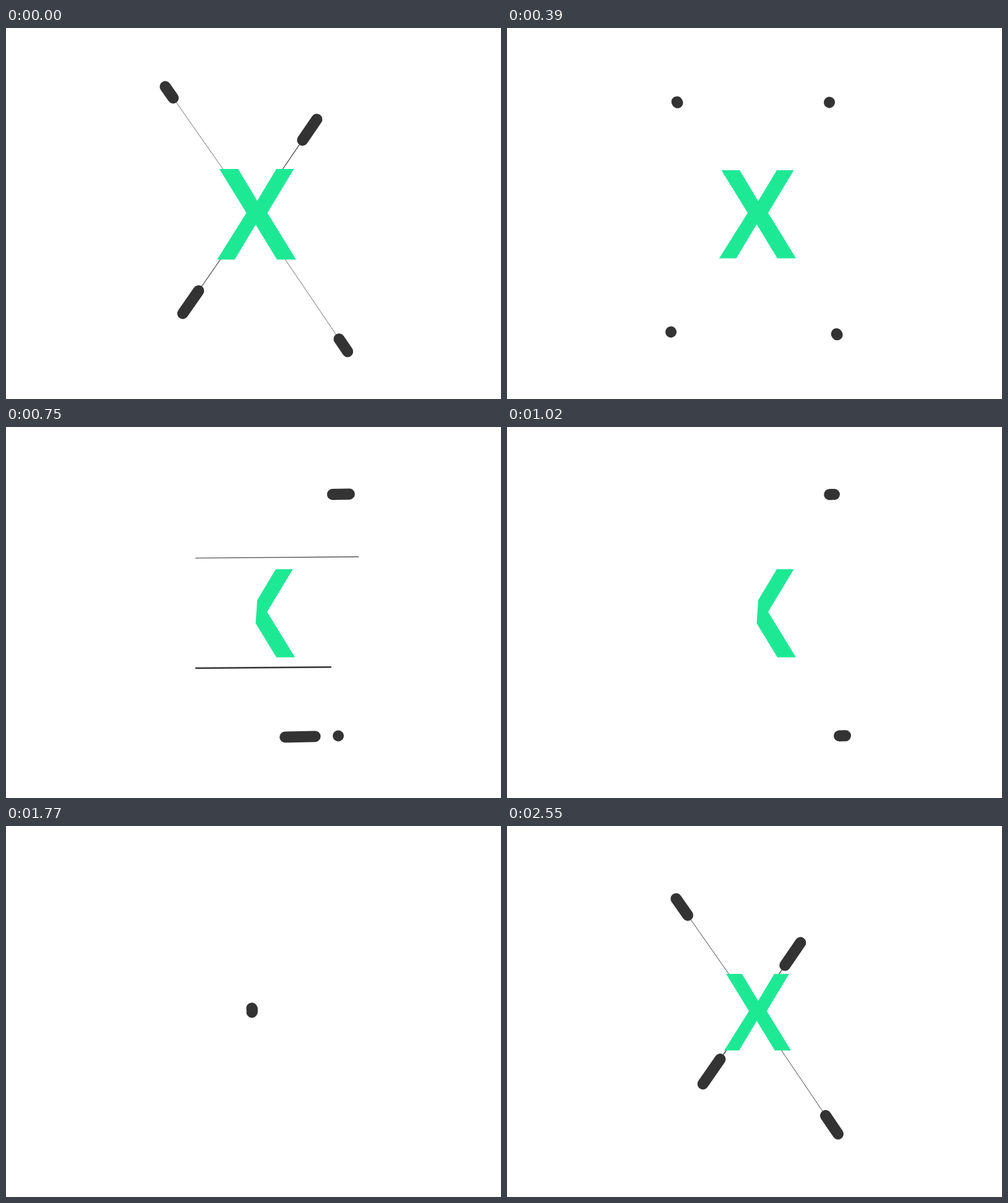
Recreate the animation shown at these times as an HTML page with a canvas. Size 800 by 600 pixels, loop 2.58 s.

```html
<!DOCTYPE html>
<html>
<head>
<meta charset="utf-8">
<style>
  html, body { margin: 0; width: 100%; height: 100%; overflow: hidden; background: #fff; }
  canvas { display: block; }
</style>
</head>
<body>
<canvas id="stage" width="800" height="600"></canvas>
<script>
const ctx = document.getElementById('stage').getContext('2d');
const LOOP = 2580, STEP = 30, SMEAR = 25;
const DARK = '#333', GREEN = '#1de995';
const CENTER = [399.5, 298];

const LEFT_HALF = [[346.5, 230], [376, 230], [406, 280], [403.5, 317.5], [370.5, 372.5], [343, 372.5], [389, 299]];
const RIGHT_HALF = [[436, 230], [463.5, 230], [422, 299], [467, 372.5], [437, 372.5], [403.5, 317.5], [406, 280]];

// Corner dots shoot out along two diagonals, one slightly later
const CORNERS = [
  { to: [271.5, 115], start: -191 },
  { to: [537, 501], start: -191 },
  { to: [526, 113], start: -132 },
  { to: [259.5, 499.5], start: -132 }
];
const SWEEPS = [
  { from: [271, 115], to: [529, 109], start: 562, line: [306, 212, 240] },
  { from: [259, 506], to: [537, 499.5], start: 610, line: [306, 390, 254] }
];

// Underdamped spring from 0 to 1, starting at rest
function spring(t, omega = 0.01247, damping = 0.512) {
  if (t <= 0) return 0;
  const a = omega * t;
  return 1 - Math.exp(-damping * a) * (Math.cos(a) + damping * Math.sin(a));
}

// Quick run to the centre, then a decaying wobble
function collapse(t) {
  const u = Math.max(0, (t - 1052) / 180);
  if (u < 1) return 1.29 * u - 0.29 * u * u;
  const s = t - 1232;
  return 1 + 0.3 * Math.exp(-0.0047 * s) * Math.sin(s * 2 * Math.PI / 480);
}

const mix = (a, b, k) => [a[0] + (b[0] - a[0]) * k, a[1] + (b[1] - a[1]) * k];

function line(a, b, width, cap) {
  if (width <= 0) return;
  ctx.strokeStyle = DARK;
  ctx.lineWidth = width;
  ctx.lineCap = cap;
  ctx.beginPath();
  ctx.moveTo(...a);
  ctx.lineTo(b[0] + 0.01, b[1]);
  ctx.stroke();
}

// A dot smeared from a moment ago to its current position
function dot(from, to, ease, t) {
  line(mix(from, to, ease(t - SMEAR)), mix(from, to, ease(t)), 18, 'round');
}

function shape(points) {
  ctx.fillStyle = GREEN;
  ctx.beginPath();
  points.forEach(p => ctx.lineTo(...p));
  ctx.fill();
}

function drawBurst(t) {
  for (const { to, start } of CORNERS) {
    const age = t - start;
    if (age > 0) line(CENTER, mix(CENTER, to, spring(age)), 1.1 - (age - 134) * 0.007, 'butt');
    dot(CENTER, to, spring, age);
  }
  const scale = spring(t + 120, 0.02, 0.8);
  ctx.save();
  ctx.translate(405, 300.5);
  ctx.scale(scale, scale);
  ctx.translate(-405, -300.5);
  shape([...LEFT_HALF.slice(0, 3), ...RIGHT_HALF.slice(0, 6), ...LEFT_HALF.slice(4)]);
  ctx.restore();
}

function drawSweep(t) {
  shape(RIGHT_HALF);
  for (const { from, to, start, line: [x, y, length] } of SWEEPS) {
    const age = t - start;
    const reach = length * spring(age);
    if (age > 0) line([x, y], [x + reach, y - reach * 0.008], 2.5 - (age - 141) * 0.031, 'butt');
    dot(to, to, spring, 0);
    dot(from, to, spring, age);
  }
}

function drawCollapse(t) {
  SWEEPS.forEach(({ to }) => dot(to, CENTER, collapse, t));
}

function draw(t) {
  ctx.clearRect(0, 0, 800, 600);
  if (t >= 2280) drawBurst(t - LOOP);
  else if (t < 555) drawBurst(t);
  else if (t < 1050) drawSweep(t);
  else drawCollapse(t);
}

function tick() {
  const t = performance.now() % LOOP;
  draw(Math.floor(t / STEP) * STEP);
  requestAnimationFrame(tick);
}
tick();
</script>
</body>
</html>
```
